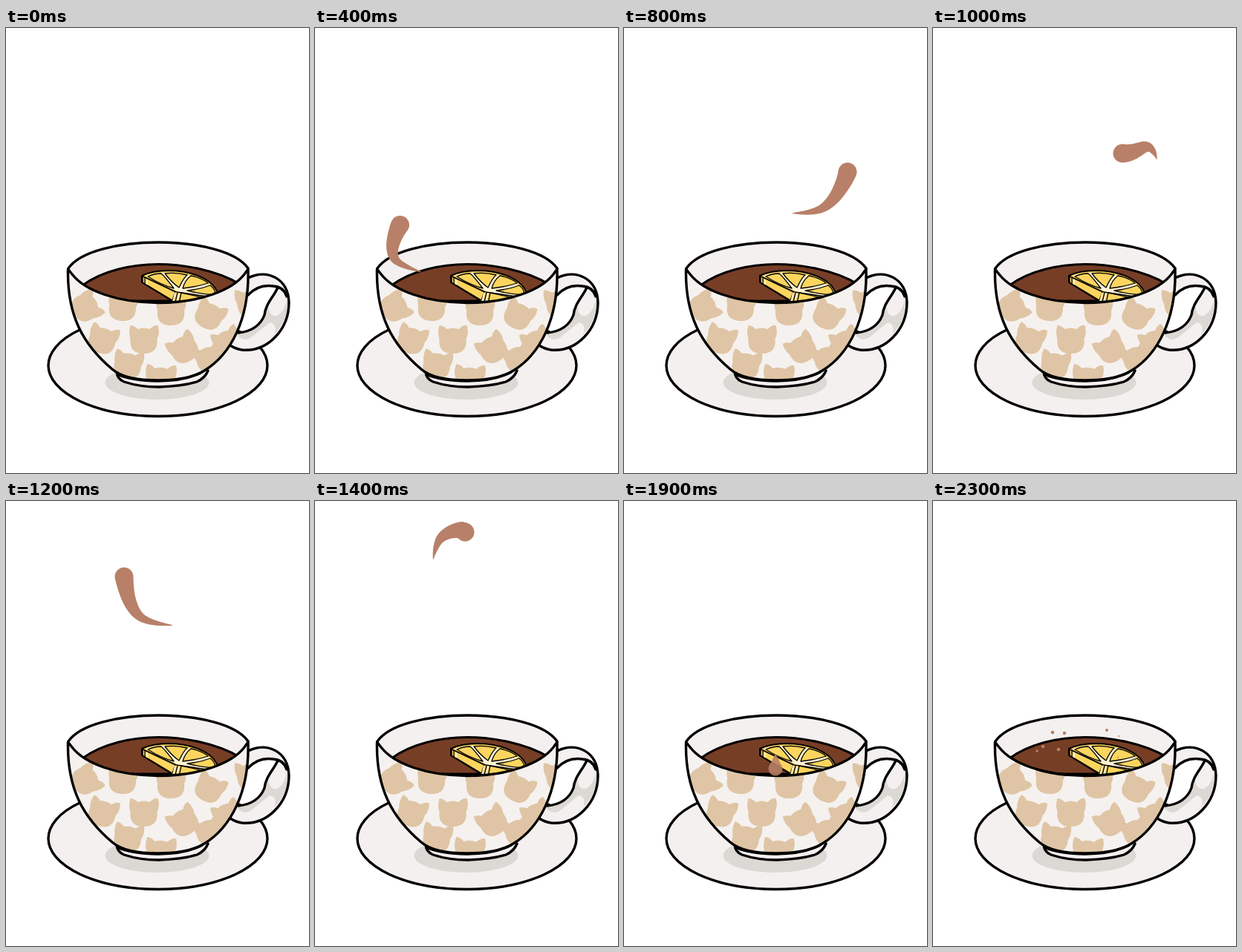
An HTML page for the animation above (2.4 s loop, 408 px wide and 600 px high).

```html
<!DOCTYPE html>
<html lang="en">
<head>
<meta charset="utf-8">
<title>Cup of tea</title>
<style>
html, body { margin: 0; height: 100%; overflow: hidden; background: #fff; }
svg { display: block; width: 408px; height: 600px; }
.line { fill: none; stroke: #000; stroke-width: 3.4; stroke-linecap: round; stroke-linejoin: round; }
.china { fill: #f4f0ef; }
.shade { fill: #dcd8d4; }
</style>
</head>
<body>
<svg viewBox="0 0 408 600">
  <defs>
    <path id="bowl" d="M89 332C106 354 150 370.500 205 370.500S304 354 321 332L326 325C328 392 303 440 267 462Q246 475 205 475Q160 475 143 460C104 427 82 388 83.500 325Z"/>
    <path id="rim" d="M84 324C100 301 152 289 205 289S310 301 326 324"/>
    <path id="cat" d="M-18-19Q-13-19-8-14Q0-17 8-14Q14-20 19-19Q22-9 18-1Q20 19 0 19Q-20 19-18-1Q-21-9-18-19Z"/>
    <clipPath id="inBowl"><use href="#bowl"/></clipPath>
  </defs>

  <!-- saucer and foot -->
  <ellipse class="line" style="fill:#f4f0ef" cx="204.500" cy="455" rx="147.500" ry="68.500"/>
  <ellipse class="shade" cx="203.500" cy="478" rx="70" ry="23"/>
  <path class="line" style="fill:#f4f0ef" d="M149 462Q149 473 159 477Q180 484 206 484Q238 483 257 477Q268 472 272 462"/>

  <!-- handle -->
  <path class="china" d="M326 337C352 324 380 338 381 370C381 407 352 437 318 434Q310 433 302 428L313 411Q338 408 347 389C352 373 367 354 359 348Q343 344 326 360Z"/>
  <path class="shade" d="M379 362C381 382 375 400 361 413Q366 399 355 397Q344 406 329 418Q320 423 311 414Q338 408 347 389Q349 382 353 375Q355 390 365 388Q376 382 379 362Z"/>
  <path class="line" d="M326 337C352 324 380 338 381 370C381 407 352 437 318 434Q310 433 302 428M326 360Q340 345 360 348Q374 349 378 362M366 350C360 363 350 371 348 387Q340 408 313 411"/>

  <!-- inside of the cup -->
  <path class="china" d="M84 324C100 301 152 289 205 289S310 301 326 324L321 335Q205 410 89 335Z"/>
  <path fill="#773e26" stroke="#000" stroke-width="3" d="M103 347C130 327 170 318.500 205 318.500S285 327 314 345L290 368H130Z"/>

  <!-- lemon -->
  <g stroke="#000" stroke-width="1.300" stroke-linejoin="round">
    <path fill="#f9cf58" stroke-width="2" d="M183 334Q197 327 220 327C257 328 283 342 286 362L270 372H230L183 343Z"/>
    <path fill="#fff3d2" stroke="none" d="M188 334Q205 329 222 330C252 331 277 342 281 358L270 362L232 356Z"/>
    <g fill="#fcd55f">
      <path d="M191 335Q200 331 209 331Q214 335 226 351Q208 346 191 335Z"/>
      <path d="M214 331Q229 329 244 333Q239 337 233 350Q223 343 214 331Z"/>
      <path d="M249 334Q264 337 272 344Q257 349 238 351Q241 340 249 334Z"/>
      <path d="M275 347Q282 352 282 360Q263 359 244 354Q262 352 275 347Z"/>
      <path d="M184 335L228 356L224 367L184 343Z"/>
      <path d="M236 357L268 364L264 371H233Z"/>
    </g>
    <path fill="none" stroke="#fff3d2" stroke-width="2" d="M190 339V346M228 357L225 369M233 357L230 369"/>
    <path fill="none" d="M183 334L230 356L285 364M187 336V345M231 357L228 369"/>
  </g>

  <!-- outside of the cup -->
  <use href="#bowl" fill="#f5f1ef"/>
  <g id="cats" fill="#dfc5a5" clip-path="url(#inBowl)"></g>
  <use href="#bowl" class="line"/>
  <use href="#rim" class="line"/>
  <path class="line" d="M150 467Q170 476 205 476Q242 476 264 464"/>

  <path id="steam" fill="#b88068"/>
</svg>
<script>
const steam = document.getElementById('steam');

// x, y, turn, size
const cats = [
  [108, 376, 62, 1], [157, 376, 5, 1], [222, 382, 0, 1], [274, 387, 28, 1],
  [130, 420, 18, 1], [185.500, 420, 0, 1], [239, 432, -33, 1], [298, 423, -25, .95],
  [164, 454, 10, 1], [208, 474, 3, 1.050], [273, 445, -18, .95], [330, 370, -10, 1.050]
];
document.getElementById('cats').innerHTML = cats.map(([x, y, a, s]) =>
  `<use href="#cat" transform="translate(${x} ${y}) rotate(${a}) scale(${s})"/>`).join('');

// where the head of the wisp is at each step
const trail = [
  [204, 355], [195, 345], [170, 337], [108, 312], [114.500, 265.500],
  [143, 249], [196, 250], [267, 243], [301, 194], [291, 161],
  [255, 169], [182, 157], [159, 102], [168, 52], [202, 42],
  [205, 90], [204, 155], [204, 225], [204, 293], [204, 361]
];
// where the splash drops end up: x, y, size
const drops = [
  [161, 312, 2.300], [177, 313, 2.300], [234, 309, 2], [250, 317, 1],
  [148, 331, 2.300], [169, 335, 2.300], [140, 337, 1.800], [249, 346, 1], [270, 348, 1]
];

const clamp = (v, a, b) => Math.min(b, Math.max(a, v));
const mix = (a, b, k) => a + (b - a) * k;
const disc = (x, y, r) => `M${x - r} ${y}a${r} ${r} 0 1 0 ${2 * r} 0a${r} ${r} 0 1 0 ${-2 * r} 0`;

function along(u) {
  u = clamp(u, 0, trail.length - 1);
  const i = Math.min(Math.floor(u), trail.length - 2), k = u - i;
  const at = n => trail[clamp(n, 0, trail.length - 1)];
  return [0, 1].map(c => {
    const [a, b, d, e] = [i - 1, i, i + 1, i + 2].map(n => at(n)[c]);
    return b + k / 2 * (d - a + k * (2 * a - 5 * b + 4 * d - e + k * (3 * (b - d) + e - a)));
  });
}

function wisp(step) {
  const fall = clamp((step - 14) / 2, 0, 1);
  const tail = Math.max(0, step - mix(1.600, .36, fall));
  const size = mix(12.500, 9.500, fall) * Math.min(1, step / 3);
  let d = '';
  for (let i = 0; i < 120; i++) {
    const k = i / 120;
    d += disc(...along(mix(step, tail, k)), size * (1 - k) ** .8);
  }
  return d;
}

function splash(step) {
  const p = (step - 19) / 4;
  return drops.map(([x, y, r], i) => disc(
    mix(204, x, p),
    mix(352, y, p) - (100 - i % 4 * 14) * 4 * p * (1 - p),
    r * mix(2, 1, p))).join('');
}

function draw(now) {
  const step = Math.floor(now % 2400 / 100);
  steam.setAttribute('d', !step ? '' : step < 20 ? wisp(step) : splash(step));
  steam.setAttribute('opacity', step == 19 ? .88 : 1);
  requestAnimationFrame(draw);
}
draw(performance.now());
</script>
</body>
</html>
```
